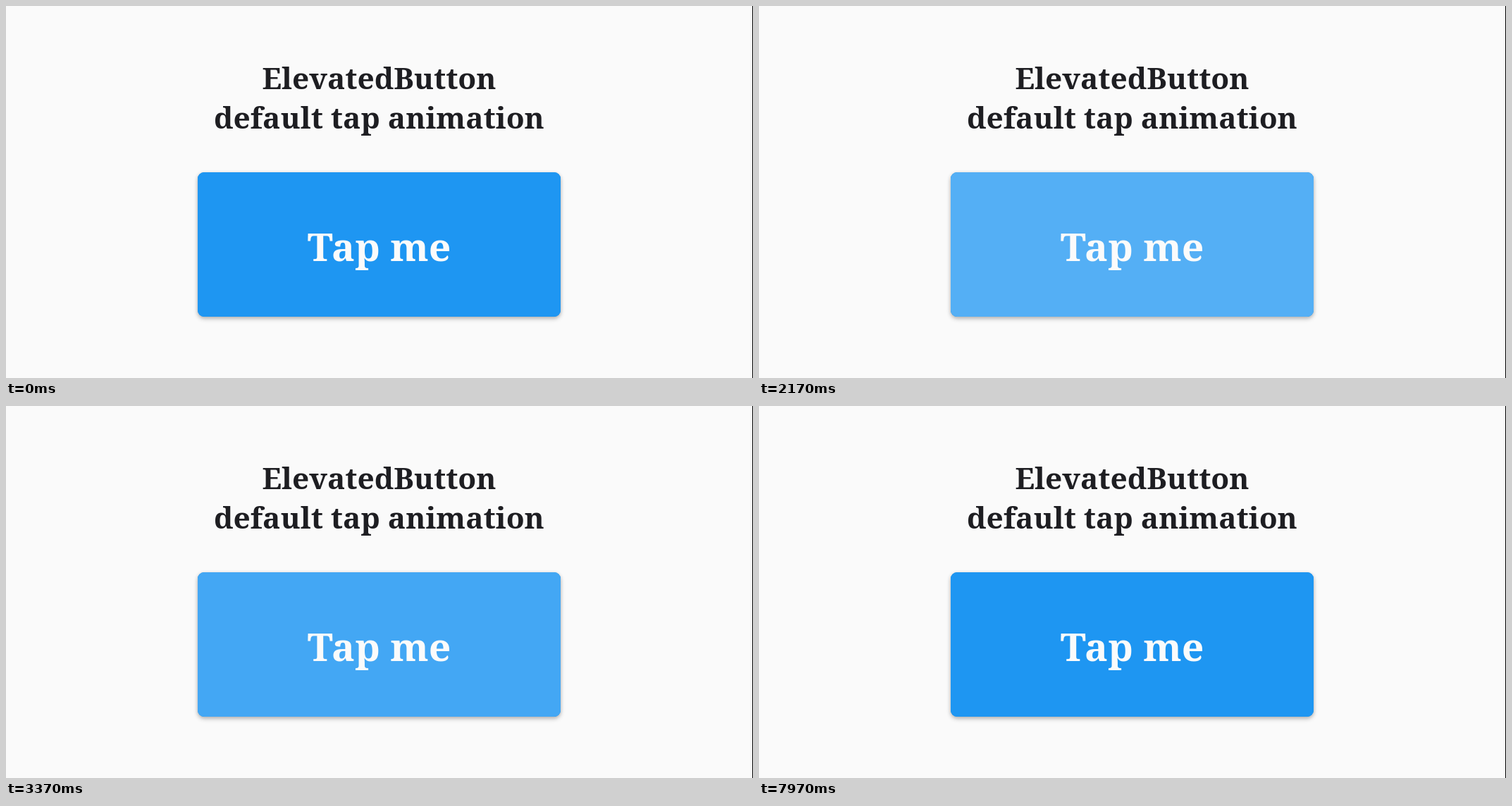
Write an HTML page with a canvas that moves like this. It is 1060 px wide and 528 px high and loops after 8000 ms.

```html
<!DOCTYPE html>
<html lang="en">
<head>
<meta charset="utf-8">
<title>Button tap animation</title>
<style>
  html, body { margin: 0; width: 100%; height: 100%; overflow: hidden; background: #fafafa; }
  canvas { display: block; }
</style>
</head>
<body>
<canvas id="stage" width="1060" height="528"></canvas>
<script>
const ctx = document.getElementById('stage').getContext('2d');
const LOOP = 8000;
const CENTER = { x: 529.5, y: 338.5 };
const SIZE = { w: 515, h: 205, radius: 9 };
const FULL_RADIUS = Math.hypot(SIZE.w, SIZE.h) / 2;

// Press and release times; x and y are relative to the button's centre.
const taps = [
  { down: 1278, up: 1960, x: 146, y: 46 },
  { down: 2550, up: 3100, x: 149, y: 35 },
];

const clamp = v => Math.min(1, Math.max(0, v));
const lerp = (a, b, t) => a + (b - a) * t;

// cubic-bezier(.25, .1, .25, 1)
function ease(x) {
  if (x <= 0 || x >= 1) return clamp(x);
  const bezier = (a, b, s) => 3 * a * s * (1 - s) ** 2 + 3 * b * s * s * (1 - s) + s ** 3;
  let lo = 0, hi = 1;
  for (let i = 0; i < 20; i++) {
    const mid = (lo + hi) / 2;
    if (bezier(.25, .25, mid) < x) lo = mid; else hi = mid;
  }
  return bezier(.1, 1, lo);
}

function label(text, y, size, color) {
  ctx.font = `bold ${size}px "Noto Serif", serif`;
  ctx.textAlign = 'center';
  ctx.fillStyle = color;
  ctx.fillText(text, 0, y);
}

function buttonPath() {
  ctx.beginPath();
  ctx.roundRect(-SIZE.w / 2, -SIZE.h / 2, SIZE.w, SIZE.h, SIZE.radius);
}

function shadow(offset, blur, alpha) {
  ctx.shadowColor = `rgba(0, 0, 0, ${alpha})`;
  ctx.shadowOffsetY = offset;
  ctx.shadowBlur = blur;
  ctx.fill();
}

// The ripple grows slowly while held and quickly once released, then fades.
function drawRipple(tap, time) {
  const held = Math.min(time, tap.up) - tap.down;
  const released = Math.max(0, time - tap.up);
  const alpha = .24 * clamp(held / 75) * (1 - clamp((released - 225) / 150));
  if (alpha <= 0) return;
  const grow = ease(clamp(held / 1000 + released / 225));
  ctx.beginPath();
  ctx.arc(lerp(tap.x, 0, grow), lerp(tap.y, 0, grow),
    lerp(FULL_RADIUS * .3, FULL_RADIUS + 5, grow), 0, Math.PI * 2);
  ctx.fillStyle = `rgba(255, 255, 255, ${alpha})`;
  ctx.fill();
}

function drawButton(time) {
  const press = taps.reduce((sum, tap) =>
    sum + ease((time - tap.down) / 200) - ease((time - tap.up) / 200), 0);
  const scale = lerp(1, .95, press);

  ctx.save();
  ctx.translate(CENTER.x, CENTER.y);
  ctx.scale(scale, scale);

  ctx.save();
  buttonPath();
  ctx.fillStyle = '#1e96f2';
  shadow(lerp(3, 14, press), lerp(6, 30, press), lerp(.24, .2, press));
  shadow(lerp(1, 4, press), lerp(5, 16, press), .1);
  ctx.restore();

  ctx.save();
  buttonPath();
  ctx.clip();
  taps.forEach(tap => drawRipple(tap, time));
  ctx.restore();

  label('Tap me', 23, 55.3, '#fbfbfb');
  ctx.restore();
}

function draw(now) {
  ctx.fillStyle = '#fafafa';
  ctx.fillRect(0, 0, 1060, 528);
  ctx.fillStyle = '#000';
  ctx.fillRect(1059, 0, 1, 528);

  ctx.save();
  ctx.translate(CENTER.x, 0);
  label('ElevatedButton', 118, 42.4, '#1e1e22');
  label('default tap animation', 174, 42.4, '#1e1e22');
  ctx.restore();

  drawButton(now % LOOP);
  requestAnimationFrame(draw);
}
requestAnimationFrame(draw);
</script>
</body>
</html>
```
